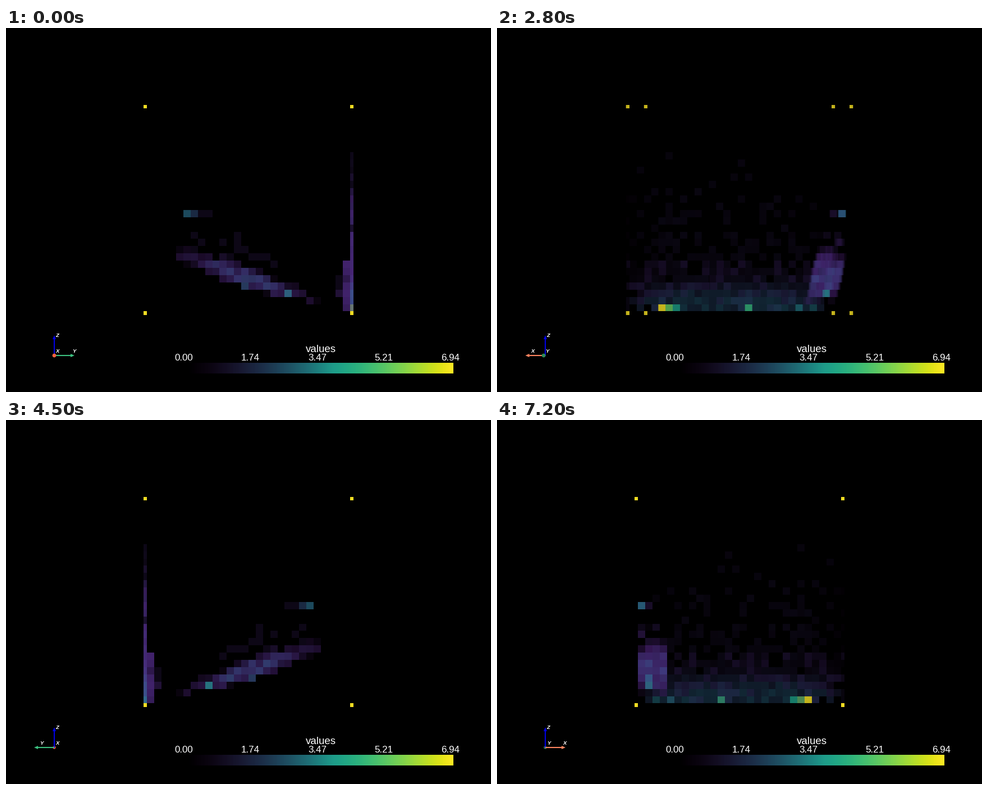
A matplotlib script for the animation above (8 s loop, 864 px wide and 648 px high).

```python
import numpy as np
import matplotlib.pyplot as plt
from matplotlib.animation import FuncAnimation
from matplotlib.patches import Ellipse, Polygon

W, H = 864, 648
N = 30                      # grid points per axis
LAST = N - 1
SIZE = 374                  # pixels across the whole grid
CELL = SIZE / LAST
V_MAX = 6.94
X0, X1 = 160, 704           # screen window of the volume
Y0, Y1 = (H - SIZE) // 2, (H + SIZE) // 2


def opacity(value):
    return np.minimum(np.asarray(value) / V_MAX / 0.55, 1)


def viridis(value):
    return plt.cm.viridis(np.asarray(value) / V_MAX)[..., :3]


# ---- sparse volume: {(x, y, z): value} ------------------------------------

def add_wall(vol, rng):
    """Hits on the far Y side, dense at the bottom and thinning upward."""
    for z in range(1, 23):
        fill = min(1, np.exp((4 - z) / 6))
        level = 0.9 + 1.35 * np.exp(-(z / 4.2) ** 4)
        for x in range(2, N):
            taper = 1 - 0.6 * abs((x - 14.5) / 14.5) ** 5
            if rng.random() < fill * taper:
                vol[x, LAST, z] = level * taper * rng.uniform(0.85, 1.15)
            if z < 8 and rng.random() < 0.33:
                vol[x, LAST - 1, z] = 0.75
            if 3 <= z <= 5 and rng.random() < 0.07:
                vol[x, LAST - 2, z] = 0.75
    hot = {3: 2.9, 5: 3.3, 12: 4.6, 22: 3.9, 23: 5.3, 24: V_MAX}
    for x, value in hot.items():
        vol[x, LAST, 1] = value


def add_track(vol, rng):
    """Sloping band near X = 0, brightest halfway, with a faint halo above."""
    for y in range(5, 25):
        middle = 7 - 0.336 * (y - 9)
        strength = 1.35 * np.exp(-((y - 14) / 9) ** 2)
        for z in range(1, 10):
            for x in range(1, 5):
                value = strength * np.exp(-((z - middle) / 1.35) ** 2)
                value *= rng.uniform(0.5, 1.5)
                if value > 0.5:
                    vol[x, y, z] = value
    for _ in range(16):
        y = int(rng.integers(7, 20))
        z = int(15 - y * 0.45 + rng.normal(0, 1.3))
        vol.setdefault((int(rng.integers(1, 4)), y, z), 0.75)
    vol.update({(1, 6, 14): 2.6, (1, 7, 14): 1.9, (2, 8, 14): 0.75,
                (2, 9, 14): 0.75, (2, 12, 6): 2.0, (2, 14, 4): 2.3,
                (2, 17, 4): 2.2, (2, 20, 3): 3.5})


def build_volume():
    rng = np.random.default_rng(7)
    ends = (0, LAST)
    vol = {(x, y, z): V_MAX for x in ends for y in ends for z in ends}
    add_wall(vol, rng)
    add_track(vol, rng)
    return vol


def span(index):
    """Centre and half size of a cell, cut at the grid bounds."""
    lo, hi = np.maximum(index - 0.5, 0), np.minimum(index + 0.5, LAST)
    return ((lo + hi) / 2 - LAST / 2) * CELL, (hi - lo) / 2 * CELL


volume = build_volume()
cells = np.array(list(volume))
values = np.array(list(volume.values()))
cx, half_x = span(cells[:, 0])
cy, half_y = span(cells[:, 1])
levels = cells[:, 2]
colors = viridis(values)
clear = 1 - 0.95 * opacity(values)      # light left after one whole cell
screen_u = np.arange(X0, X1) + 0.5 - W / 2
pixel_row = np.rint((Y1 - 0.6 - np.arange(Y0, Y1)) / CELL).astype(int)


def render(angle):
    """Blend the cells back to front, using the ray length inside each."""
    cos, sin = np.cos(angle), np.sin(angle)
    c, s = max(abs(cos), 1e-6), max(abs(sin), 1e-6)
    u = cy * cos - cx * sin
    depth = cx * cos + cy * sin
    wide, tall = half_x * s, half_y * c
    outer, slope = wide + tall, 2 * np.minimum(wide, tall) + 1e-6
    length = np.minimum(2 * half_x / c, 2 * half_y / s) / CELL
    first = np.floor(u - outer - screen_u[0]).astype(int)
    stop = np.ceil(u + outer - screen_u[0]).astype(int) + 1

    rows = np.zeros((N, len(screen_u), 3))
    for n in np.argsort(depth):
        part = slice(first[n], stop[n])
        chord = np.clip((outer[n] - np.abs(screen_u[part] - u[n])) / slope[n], 0, 1)
        alpha = (1 - clear[n] ** (chord * length[n]))[:, None]
        strip = rows[levels[n], part]
        strip += (colors[n] - strip) * alpha
    return rows[pixel_row]


# ---- stage ----------------------------------------------------------------

fig = plt.figure(figsize=(W / 100, H / 100), dpi=100, facecolor="black")
ax = fig.add_axes([0, 0, 1, 1])
ax.axis("off")

picture = ax.imshow(np.zeros((Y1 - Y0, X1 - X0, 3)), extent=(X0, X1, Y1, Y0),
                    interpolation="nearest", aspect="auto")
ramp = np.linspace(0, V_MAX, 256)
bar = viridis(ramp) * opacity(ramp)[:, None]
ax.imshow(bar[None], extent=(322, 797, 615, 596), interpolation="nearest", aspect="auto")
ax.set_xlim(0, W)
ax.set_ylim(H, 0)


def label(x, y, text, px, **style):
    return ax.text(x, y, text, color="white", fontsize=px * 0.72, ha="center",
                   family="Liberation Sans", zorder=9, **style)


label(561, 577, "values", 18.8)
for n in range(5):
    label(317 + 118.75 * n, 592, f"{V_MAX * n / 4:.2f}", 17)

# ---- orientation axes -----------------------------------------------------

OX, OY, ARM, CONE = 86, 583, 36, 29
TAG = dict(weight="bold", style="italic", va="center")
BLUE = "#0000e6"
ax.plot([OX, OX], [OY, OY - CONE], color=BLUE, lw=1.5, zorder=4)
ax.add_patch(Polygon([(OX - 3, OY - CONE), (OX + 3, OY - CONE), (OX, OY - ARM)],
                     color=BLUE, lw=0, zorder=4))
label(91, 547, "Z", 9.5, **TAG)


class Arrow:
    def __init__(self, name, shaft, face):
        self.line, = ax.plot([], [], color=shaft, lw=1.5, solid_capstyle="butt")
        self.tip = Polygon([(0, 0)] * 3, color=shaft, lw=0)
        self.base = Ellipse((OX, OY), 1, 1, color=face, lw=0)
        ax.add_patch(self.tip)
        ax.add_patch(self.base)
        self.tag = label(OX, 575.5, name, 9.5, **TAG)

    def point(self, side, toward):
        zoom = 1 / (1 - 0.12 * toward)      # slight perspective
        x = OX + CONE * side * zoom
        radius = 3 * zoom
        self.line.set_data([OX, x], [OY, OY])
        self.tip.set_xy([(x, OY - radius), (x, OY + radius),
                         (OX + ARM * side * zoom, OY)])
        self.base.set_center((x, OY))
        self.base.set_width(2 * radius * abs(toward))
        self.base.set_height(2 * radius)
        self.tag.set_x(OX + 6 + CONE * side * zoom)
        for part in (self.line, self.tip, self.base):
            part.set_zorder(4 + toward)


arrow_x = Arrow("X", "#ff8560", "#f5603f")
arrow_y = Arrow("Y", "#3cc080", "#2e8b57")

# ---- motion: three quarter turns of 18 steps, each followed by a rest ------

cache = {}


def update(frame):
    step = sum(min(max(frame - 27 * turn, 0), 18) for turn in range(3))
    angle = np.radians(5 * step)
    if step not in cache:
        cache[step] = render(angle)
    picture.set_data(cache[step])
    cos, sin = np.cos(angle), np.sin(angle)
    arrow_x.point(-sin, cos)
    arrow_y.point(cos, sin)
    return picture,


anim = FuncAnimation(fig, update, frames=80, interval=100, repeat=True,
                     repeat_delay=0, blit=False)
plt.show()
```
